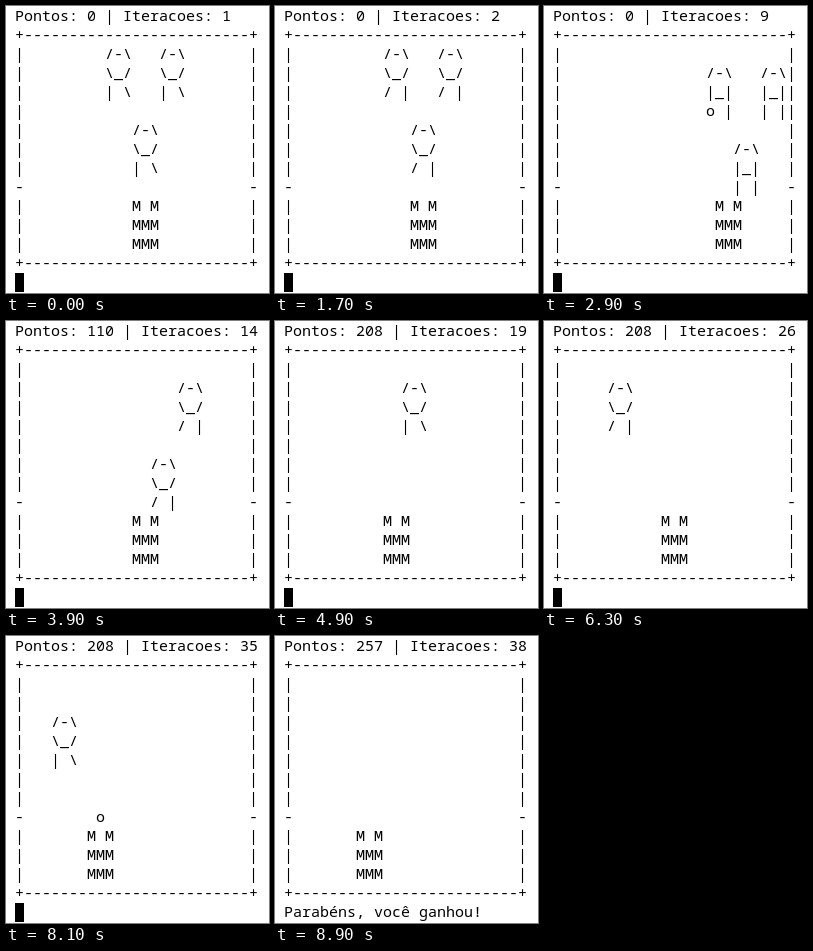
These frames come from a looping animation (263 px wide and 287 px high, 9.3 s). An HTML page:

```html
<!DOCTYPE html>
<html lang="pt">
<head>
<meta charset="utf-8">
<title>Invasores</title>
<style>
html, body {
  margin: 0;
  width: 100%;
  height: 100%;
  overflow: hidden;
  background: #fff;
}
#screen {
  position: absolute;
  left: 9px;
  top: 0;
  margin: 0;
  color: #000;
  font: 15px/19px "Noto Sans Mono", "DejaVu Sans Mono", monospace;
  font-variant-ligatures: none;
  white-space: pre;
}
#cursor {
  position: absolute;
  left: 9px;
  top: 267px;
  width: 9px;
  height: 19px;
  background: #000;
}
</style>
</head>
<body>
<pre id="screen"></pre>
<div id="cursor"></div>
<script>
const LOOP = 9300, LAST = 38, WIDTH = 25, HEIGHT = 11, LINE = 7;
const OPENING = [1700, 1900, 2100, 2200, 2300, 2500, 2700];
const SHIP = ["M M", "MMM", "MMM"];
const STEPS = [["/-\\", "\\_/", "/ |"], ["/-\\", "\\_/", "| \\"]];
const DROP = ["/-\\", "|_|", "| |"];

// col and row are the starting cell, end is the turn it disappears
const ALIENS = [
  { col: 10, row: 0, end: 10 },
  { col: 16, row: 0, end: LAST },
  { col: 13, row: 4, end: 18 }
];
// a shot leaves the line at turn start and climbs one row per turn
const SHOTS = [
  { col: 17, start: 5, end: 10 },
  { col: 12, start: 17, end: 18 },
  { col: 9, start: 35, end: LAST }
];
// [turn, column] stops, one column per turn between them
const ROUTE = [[1, 13], [4, 16], [5, 16], [7, 18], [9, 18], [16, 11],
  [22, 11], [23, 12], [26, 12], [30, 8], [LAST, 8]];

const screenEl = document.getElementById("screen");
const cursorEl = document.getElementById("cursor");

function turnAt(t) {
  if (t < 2900) return 1 + OPENING.filter(s => t >= s).length;
  return Math.min(LAST, 9 + Math.floor((t - 2900) / 200));
}

function shipCol(n) {
  const i = Math.max(1, ROUTE.findIndex(p => p[0] >= n));
  const [n0, c0] = ROUTE[i - 1], [n1, c1] = ROUTE[i];
  return Math.round(c0 + (c1 - c0) * (n - n0) / (n1 - n0));
}

function marchOffset(n) {
  if (n < 9) return n - 1;
  return n < 32 ? 16 - n : n - 47;
}

function score(n) {
  if (n < 10) return 0;
  if (n < 18) return 110;
  return n < LAST ? 208 : 257;
}

function stamp(grid, sprite, col, row) {
  sprite.forEach((line, y) => [...line].forEach((ch, x) => {
    if (ch !== " ") grid[row + y][col + x] = ch;
  }));
}

function board(n) {
  const grid = Array.from({ length: HEIGHT }, (_, y) => {
    const side = y === LINE ? "-" : "|";
    return [side, ...Array(WIDTH).fill(" "), side];
  });
  const turning = n === 9 || n === 32;
  const down = (n >= 9) + (n >= 32);
  for (const a of ALIENS) {
    if (n < a.end) {
      stamp(grid, turning ? DROP : STEPS[n % 2], a.col + marchOffset(n), a.row + down);
    }
  }
  for (const s of SHOTS) {
    if (n >= s.start && n < s.end) stamp(grid, ["o"], s.col, LINE - (n - s.start));
  }
  stamp(grid, SHIP, shipCol(n), 8);
  return grid.map(r => r.join(""));
}

function render(n) {
  const edge = "+" + "-".repeat(WIDTH) + "+";
  return [
    `Pontos: ${score(n)} | Iteracoes: ${n}`,
    edge, ...board(n), edge,
    n === LAST ? "Parabéns, você ganhou!" : ""
  ].join("\n");
}

let shown = 0;
function frame(now) {
  const t = now % LOOP;
  const n = turnAt(t);
  if (n !== shown) {
    screenEl.textContent = render(n);
    shown = n;
  }
  cursorEl.style.top = n === LAST ? "286px" : "267px";
  cursorEl.style.visibility = t < 8900 ? "visible" : "hidden";
  requestAnimationFrame(tick);
}

const begin = performance.now();
function tick() {
  frame(performance.now() - begin);
}
tick();
</script>
</body>
</html>
```
